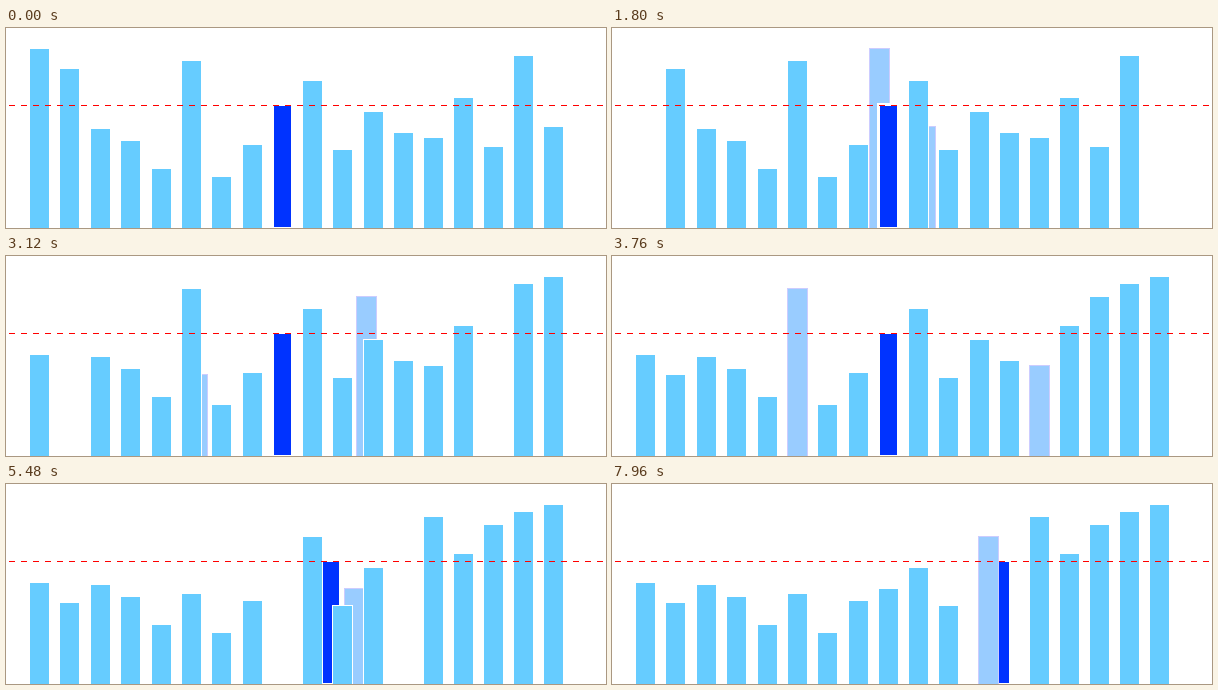
An HTML page with a canvas for the animation above (8000 ms loop, 600 by 200 pixels).

```html
<!DOCTYPE html>
<html lang="en">
<head>
<meta charset="utf-8">
<title>Quicksort partition</title>
<style>
html, body { margin: 0; width: 100%; height: 100%; overflow: hidden; background: #fff; }
canvas { display: block; width: 600px; height: 200px; }
</style>
</head>
<body>
<canvas id="stage" width="600" height="200"></canvas>
<script>
const ctx = document.getElementById('stage').getContext('2d');
const LOOP = 8000, TICK = 40;
const BAR_W = 19, FLOOR = 200, PIVOT = 8;

// The values to partition, as the top edge of each bar
const tops = [21, 41, 101, 113, 141, 33, 149, 117, 78, 53, 122, 84, 105, 110, 70, 119, 28, 99];
const last = tops.length - 1;

// Evenly spaced slots, bowed slightly to the right in the middle
const slotX = i => 24 + 514 * i / last + 0.0145 * i * (last - i);

// Partition around the pivot and list the swaps as pairs of bars
function partition() {
  const order = tops.map((_, i) => i), swaps = [];
  const isShort = slot => tops[order[slot]] > tops[PIVOT];
  const swap = (i, j) => {
    swaps.push([order[i], order[j]]);
    [order[i], order[j]] = [order[j], order[i]];
  };
  let i = 0, j = last;
  while (true) {
    while (isShort(i)) i++;
    while (!isShort(j)) j--;
    if (i > j) break;
    swap(i, j);
  }
  swap(i, order.indexOf(PIVOT));
  return swaps;
}

// Times in ticks: a pair is marked, moves, rests, then loses its mark
const REST = 9.15;
function schedule([a, b], n) {
  const move = 41 + 31.3 * n;
  const steps = Math.max(10, Math.ceil(Math.abs(slotX(a) - slotX(b)) / 50));
  return {
    a, b, steps,
    move: Math.floor(move),
    mark: Math.floor(move - REST),
    done: Math.floor(move + steps + REST)
  };
}
const swaps = partition().map(schedule);

function box(color, x, y, w, bottom = FLOOR) {
  ctx.fillStyle = color;
  ctx.fillRect(x, y, w, bottom - y);
}

function drawBar(i, x, marked) {
  const y = tops[i];
  if (i === PIVOT) {
    box('#fff', x - 2, y - 3, BAR_W + 3);
    box('#0033ff', x + 1, y, BAR_W - 2, FLOOR - 1);
  } else {
    box(marked ? '#ccccff' : '#fff', x - 1, y - 1, BAR_W + 2);
    box(marked ? '#99ccff' : '#66ccff', x, y, BAR_W);
  }
}

function drawLevel() {
  const y = tops[PIVOT] - 1;
  for (let x = 3; x < 597; x += 12) box('#f00', x, y, 6, y + 1);
}

function draw(t) {
  const tick = Math.floor(t / TICK);
  const xs = tops.map((_, i) => slotX(i));
  const marked = new Set();
  for (const s of swaps) {
    if (tick >= s.mark && tick < s.done) marked.add(s.a).add(s.b);
    const p = Math.min(Math.max((tick - s.move + 1) / s.steps, 0), 1);
    const shift = (xs[s.b] - xs[s.a]) * p;
    xs[s.a] += shift;
    xs[s.b] -= shift;
  }
  box('#fff', 0, 0, 600);
  // Marked bars pass behind the others
  const paint = on => xs.forEach((x, i) => {
    if (marked.has(i) === on) drawBar(i, Math.round(x), on);
  });
  paint(true);
  paint(false);
  drawLevel();
}

const start = performance.now();
function frame() {
  draw((performance.now() - start) % LOOP);
  requestAnimationFrame(frame);
}
frame();
</script>
</body>
</html>
```
